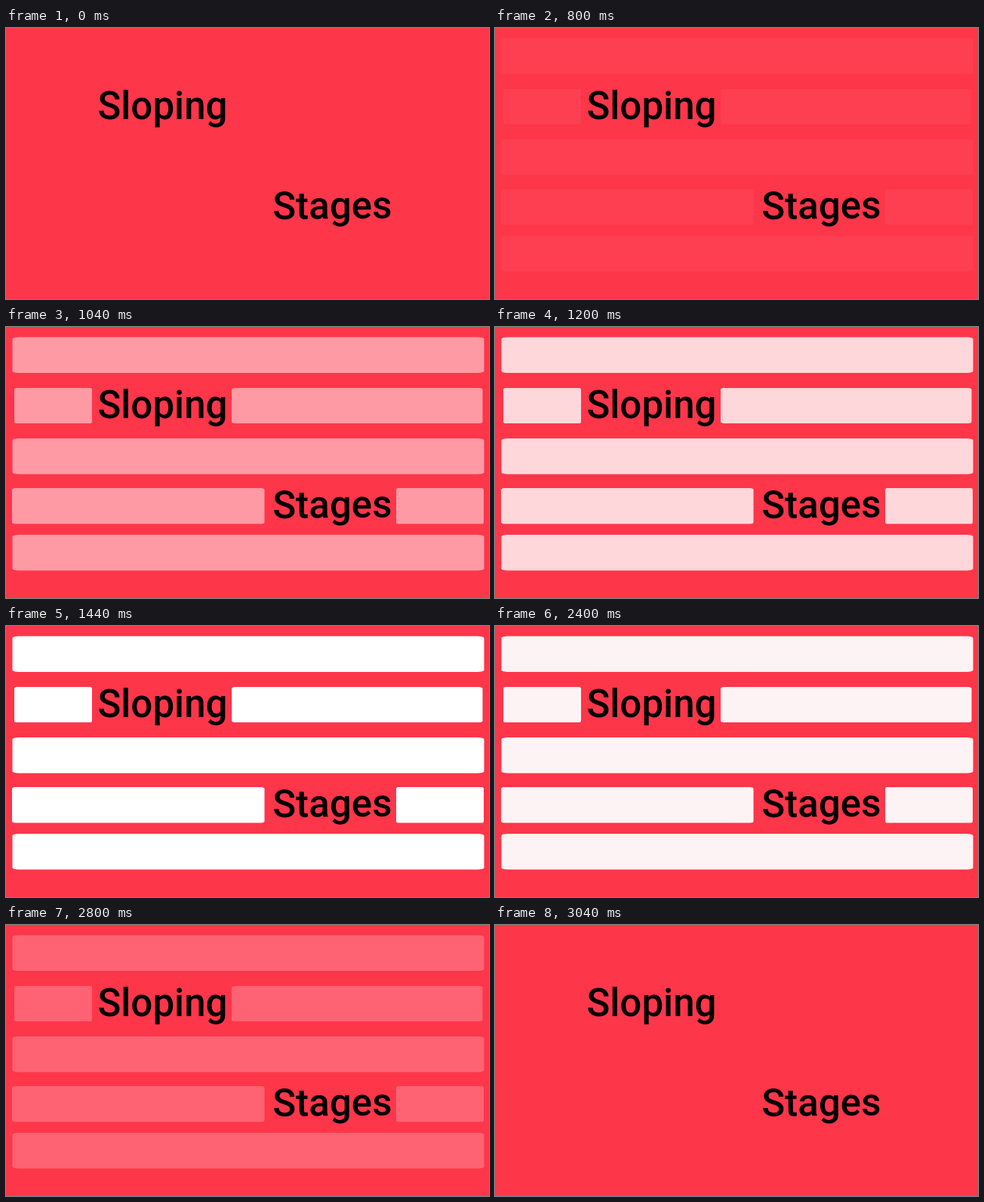
An HTML page for the animation above (3.68 s loop, 640 by 360 pixels).

```html
<!DOCTYPE html>
<html lang="en">
<head>
<meta charset="utf-8">
<title>Sloping Stages</title>
<style>
  html, body { margin: 0; width: 100%; height: 100%; overflow: hidden; background: #fe364a; }
  svg { display: block; width: 640px; height: 360px; }
  text { font: 500 51px Roboto, sans-serif; }
</style>
</head>
<body>
<svg viewBox="0 0 640 360">
  <g id="bars" fill="#fff" opacity="0"></g>
  <text x="121.5" y="121">Sloping</text>
  <text x="353.5" y="254" transform="rotate(-0.5 353.5 254)">Stages</text>
</svg>
<script>
const LOOP = 3680, STEP = 80, FADE_IN = 800, FADE_OUT = 2400;
const bars = document.getElementById('bars');

function addBar(left, right, top, height = 47.5) {
  const bar = document.createElementNS(bars.namespaceURI, 'rect');
  const width = right - left;
  // Corners are stretched along with the bar
  const shape = { x: left, y: top, width, height, rx: Math.max(2, width / 75), ry: 2.5 };
  for (const key in shape) bar.setAttribute(key, shape[key]);
  bars.append(bar);
}

for (const top of [13.5, 148, 276]) addBar(8.5, 633.5, top);
addBar(11, 114, 81, 47);
addBar(299, 631.5, 81, 47);
addBar(8, 342.5, 214);
addBar(517, 633, 214);

function opacityAt(time) {
  if (time < FADE_IN) return 0;
  const stepsSince = start => Math.floor((time - start) / STEP);
  const value = time < FADE_OUT
    ? 0.04 + 0.153 * stepsSince(FADE_IN)
    : 0.94 - 0.143 * stepsSince(FADE_OUT);
  return Math.min(1, Math.max(0, value));
}

function draw() {
  bars.setAttribute('opacity', opacityAt(performance.now() % LOOP));
  requestAnimationFrame(draw);
}
draw();
</script>
</body>
</html>
```
